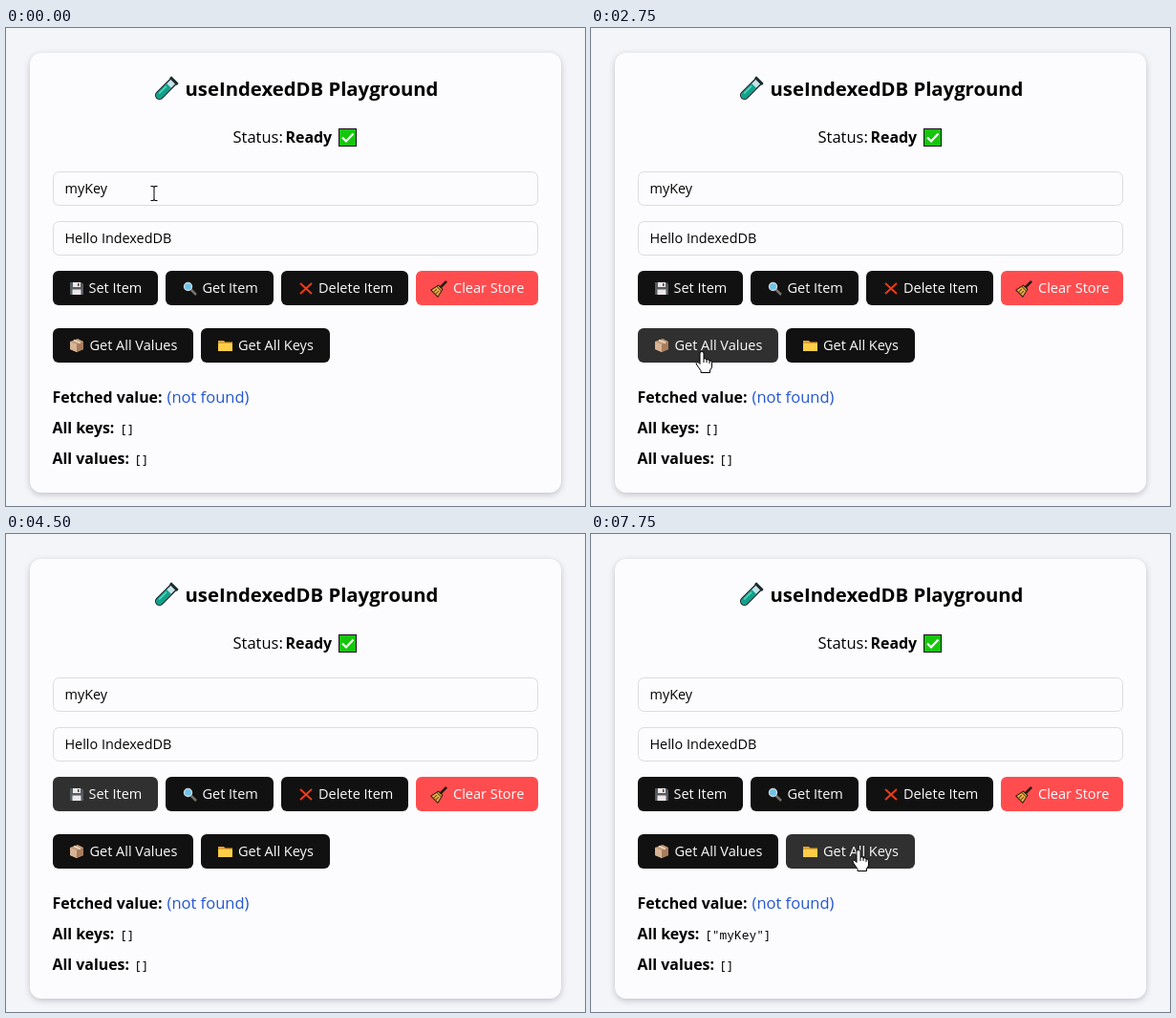
Animation, 606 px wide and 500 px high, one loop 8000 ms. Source, as an HTML page:

```html
<!DOCTYPE html>
<html lang="en">
<head>
<meta charset="utf-8">
<title>useIndexedDB Playground</title>
<style>
  html, body { margin: 0; width: 100%; height: 100%; overflow: hidden; background: #f4f5f9; }
  svg { display: block; width: 606px; height: 500px; font-family: "Open Sans", "Noto Sans", sans-serif; }
  .card { fill: #fcfcff; filter: drop-shadow(0 2px 3px rgba(60, 60, 70, .28)); }
  .input { fill: #fcfcff; stroke: #dcdcde; }
  .button { fill: #111; }
  .button.hover { fill: #303030; }
  .button.danger { fill: #ff4d4f; }
  .label { fill: #fcfcff; font-size: 14.5px; }
  .field { font-size: 14.4px; }
  .body { font-size: 16.5px; }
  .strong { font-size: 15.9px; font-weight: 700; }
  .title { font-size: 20.3px; font-weight: 700; text-anchor: middle; }
  .code { font: 12.9px "Noto Sans Mono", "DejaVu Sans Mono", monospace; }
</style>
</head>
<body>
<svg viewBox="0 0 606 500">
  <rect class="card" x="25" y="26" width="556" height="460" rx="12"/>

  <!-- test tube -->
  <g transform="translate(167 64) rotate(45)">
    <path d="M-4-12V9a4 4 0 0 0 8 0V-12z" fill="#c5e3ea" stroke="#1d2b2d" stroke-width="1.4"/>
    <path d="M-3.4-5H3.4V9a3.4 3.4 0 0 1-6.8 0z" fill="#0fa28c"/>
    <path d="M-1.6-3V8" stroke="#5ed6c0" stroke-width="1.5"/>
    <rect x="-5.5" y="-14" width="11" height="3" rx="1" fill="#1d2b2d"/>
  </g>
  <text class="title" x="320" y="71">useIndexedDB Playground</text>

  <text class="body" x="237.500" y="120">Status:</text>
  <text class="strong" x="292.500" y="120">Ready</text>
  <rect x="348.500" y="105.500" width="18" height="18" fill="#16c60c" stroke="#111"/>
  <path d="M352 114.500l4 4 7.500-8" fill="none" stroke="#fff" stroke-width="2.200"/>

  <rect class="input" x="49.500" y="150.500" width="507" height="35" rx="6"/>
  <rect class="input" x="49.500" y="202.500" width="507" height="35" rx="6"/>
  <text class="field" x="61.500" y="173">myKey</text>
  <text class="field" x="61.500" y="225">Hello IndexedDB</text>

  <g id="buttons"></g>

  <!-- floppy disk -->
  <g transform="translate(67 266)">
    <path d="M0 0H12L14 2V13H0z" fill="#555b5f"/>
    <path d="M3 0H11V5H3zM2.500 7.500H11.500V13H2.500z" fill="#ece6e8"/>
    <path d="M8 1H9.500V4H8z" fill="#444"/>
  </g>
  <!-- magnifier -->
  <g transform="translate(185 265)">
    <path d="M8.500 8.500L14 14" stroke="#77706c" stroke-width="2.500"/>
    <circle cx="5.500" cy="5.500" r="4" fill="#6cc4ea" stroke="#c6d2d8" stroke-width="1.500"/>
  </g>
  <!-- cross -->
  <path d="M308 267L320 278M320 267L308 278" stroke="#f03a17" stroke-width="2"/>
  <!-- broom -->
  <g transform="translate(454 272) rotate(45)">
    <path d="M0-10V0" stroke="#241b10" stroke-width="2.600"/>
    <path d="M-3-1H3L5 8H-5z" fill="#e8b04a" stroke="#241b10"/>
    <path d="M-3.300 1H3.300M-1.500 3V8M1.500 3V8" stroke="#6b4218"/>
  </g>
  <!-- package -->
  <g transform="translate(67 325)">
    <path d="M0 3L8 0L14 3V11L7 14L0 11z" fill="#c09a78"/>
    <path d="M0 3L7 6V14L0 11z" fill="#d8b496"/>
    <path d="M7 6L14 3V11L7 14z" fill="#a87c5c"/>
    <path d="M4 1.500L11 4.500" stroke="#eed8c0" stroke-width="1.500"/>
  </g>
  <!-- folder -->
  <path d="M222 327H228L229.500 328.500H237V338H222z" fill="#e0a22c"/>
  <path d="M222 330H237V338H222z" fill="#ffce48"/>

  <text class="strong" x="48.500" y="392">Fetched value:</text>
  <text class="body" x="168.500" y="392" fill="#2456d0">(not found)</text>
  <text class="strong" x="48.500" y="424">All keys:</text>
  <text class="strong" x="48.500" y="456">All values:</text>
  <text class="code" id="keys" x="119" y="424"></text>
  <text class="code" x="134" y="456">[]</text>

  <g id="cursor">
    <path id="arrow" d="M.5.5V16L4.200 12.500L6.700 18.500L9 17.500L6.500 11.700H11.500z" fill="#fff" stroke="#000"/>
    <g id="beam" fill="none" stroke="#000">
      <path d="M-3.500-7.500H-1Q0-7.500 0-6.500Q0-7.500 1-7.500H3.500M0-7V7M-3.500 7.500H-1Q0 7.500 0 6.500Q0 7.500 1 7.500H3.500"/>
    </g>
    <g id="hand" stroke="#000" stroke-linejoin="round">
      <path d="M-2 2Q-2 .5 0 .5Q2 .5 2 2V8Q4.500 7 5 9Q7.500 8 8 10Q10.500 9.500 10.500 12V16Q10.500 18 8.500 20V22.500H-1V20.500L-5.500 14Q-6.500 12 -5 11.300Q-4 11-2 13.500z" fill="#fff"/>
      <path d="M2 8V12M5 9V12M8 10V13" fill="none"/>
    </g>
  </g>
</svg>
<script>
const LOOP = 8000, FPS = 12;
const byId = id => document.getElementById(id);

// label, x, y, width, offset of the text
const BUTTONS = [
  ["Set Item", 49, 254, 110, 37.5],
  ["Get Item", 167, 254, 113, 38.5],
  ["Delete Item", 288, 254, 133, 39],
  ["Clear Store", 429, 254, 128, 39],
  ["Get All Values", 49, 314, 147, 38.5],
  ["Get All Keys", 204, 314, 135, 39]
];
const INPUTS = [["key", 49, 150, 508], ["value", 49, 202, 508]];
const SET_ITEM = 0;

// step, x, y of the pointer; straight runs in between
const PATH = [
  [5, 155, 173], [6, 150, 176], [8, 163, 245], [10, 200, 330], [11, 228, 372],
  [14, 284, 334], [20, 284, 334], [21, 283, 331], [23, 180, 342], [25, 116, 338],
  [33, 116, 338], [36, 395, 61], [38, 45, 215], [39, 52, 255], [40, 75, 268],
  [42, 101, 270], [51, 101, 270], [53, 270, 78], [68, 163, 266], [69, 168, 325],
  [70, 170, 366], [72, 215, 358], [77, 280, 330]
];
const DIALOG = { leave: 52, open: 54, close: 66, back: 68 };
const KEYS_FETCHED = 93;

function add(tag, attrs, text = "") {
  const node = document.createElementNS("http://www.w3.org/2000/svg", tag);
  for (const name in attrs) node.setAttribute(name, attrs[name]);
  node.textContent = text;
  return byId("buttons").appendChild(node);
}

const buttonRects = BUTTONS.map(([label, x, y, width, inset]) => {
  const style = label === "Clear Store" ? "button danger" : "button";
  const rect = add("rect", { class: style, x, y, width, height: 36, rx: 6 });
  add("text", { class: "label", x: x + inset, y: y + 23 }, label);
  return rect;
});

function pointerAt(step) {
  const next = PATH.findIndex(p => p[0] >= step);
  if (next === 0) return PATH[0].slice(1);
  if (next < 0) return PATH[PATH.length - 1].slice(1);
  const [s0, x0, y0] = PATH[next - 1], [s1, x1, y1] = PATH[next];
  const u = (step - s0) / (s1 - s0);
  return [Math.round(x0 + (x1 - x0) * u), Math.round(y0 + (y1 - y0) * u)];
}

const hit = (boxes, [px, py]) => boxes.findIndex(([, x, y, width]) =>
  px >= x && px < x + width && py >= y && py < y + 36);

function hoveredAt(step) {
  if (step >= DIALOG.leave && step < DIALOG.close) return SET_ITEM;
  if (step >= DIALOG.close && step < DIALOG.back) return -1;
  // the highlight needs one step to appear
  const now = hit(BUTTONS, pointerAt(step));
  return now === hit(BUTTONS, pointerAt(step - 1)) ? now : -1;
}

function show(id, visible) {
  byId(id).setAttribute("visibility", visible ? "visible" : "hidden");
}

function render(time) {
  const step = Math.floor((time % LOOP + 4) * FPS / 1000);
  const point = pointerAt(step);
  const visible = step < DIALOG.open || step >= DIALOG.back;
  const overButton = hit(BUTTONS, point) >= 0;
  const overInput = hit(INPUTS, point) >= 0;
  byId("cursor").setAttribute("transform", `translate(${point})`);
  show("hand", visible && overButton);
  show("beam", visible && overInput);
  show("arrow", visible && !overButton && !overInput);

  const hovered = hoveredAt(step);
  buttonRects.forEach((rect, i) => rect.classList.toggle("hover", i === hovered));
  byId("keys").textContent = step >= KEYS_FETCHED ? '["myKey"]' : "[]";
}

const start = performance.now();
function tick() {
  render(performance.now() - start);
  requestAnimationFrame(tick);
}
tick();
</script>
</body>
</html>
```
